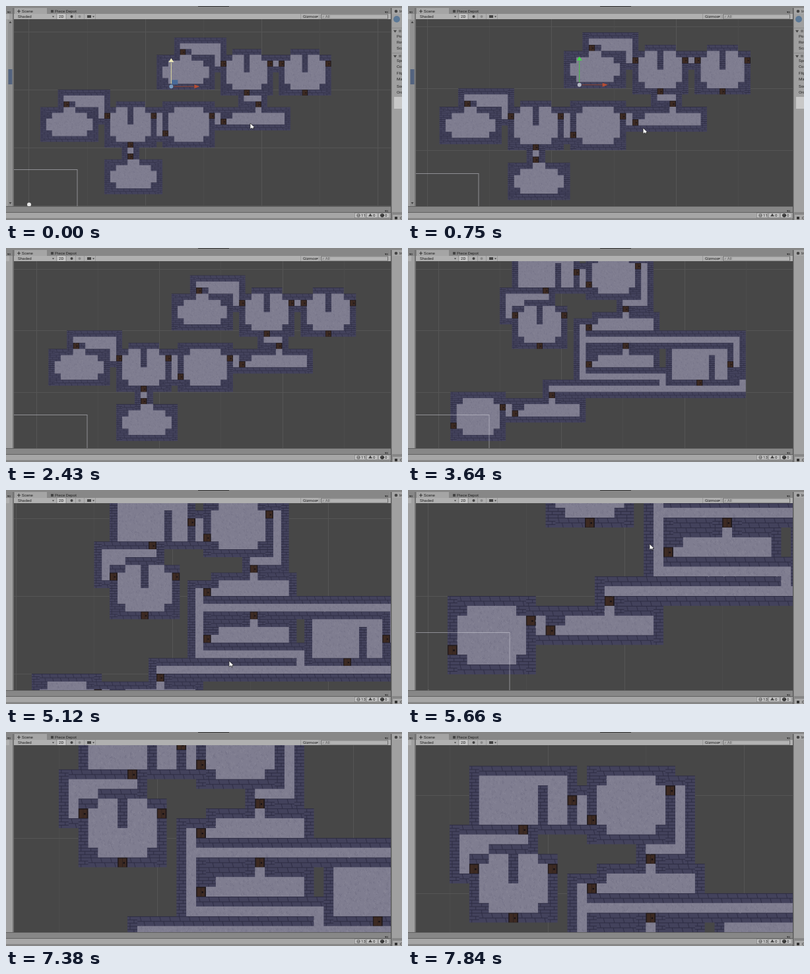
Recreate the animation shown at these times as an HTML page with a canvas. Size 600 by 325 pixels, loop 8 s.

```html
<!DOCTYPE html>
<html lang="en">
<head>
<meta charset="utf-8">
<title>Dungeon generator</title>
<style>
html, body { margin: 0; width: 100%; height: 100%; overflow: hidden; background: #8b8b8b; }
canvas { display: block; }
</style>
</head>
<body>
<canvas id="stage" width="600" height="325"></canvas>
<script>
const ctx = document.getElementById('stage').getContext('2d');
const LOOP = 8000, TILE = 30;
const LEFT = -10, TOP = -2, COLS = 54, ROWS = 36;   // tile area kept in a map image

let seed = 7;
const rnd = () => (seed = seed * 16807 % 2147483647) / 2147483647;

const UP = [0, -1], DOWN = [0, 1], WEST = [-1, 0], EAST = [1, 0];

// Room kinds: a body in local tiles, and doors given by place and direction.
const kinds = {
  forked: {
    doors: { left: [0, 2, WEST], right: [8, 2, EAST], bottom: [4, 7, DOWN] },
    body({ wall, floor, pillar }) {
      wall(0, 1, 9, 7); wall(2, 0, 5, 1);
      floor(2, 1, 5, 6); floor(1, 2, 7, 4);
      pillar(4, 1, 1, 3);
    }
  },
  oval: {
    doors: { top: [4, -1, UP] },
    body({ wall, floor }) {
      wall(0, 0, 10, 6);
      floor(4, 0, 2, 1); floor(2, 1, 6, 4); floor(1, 2, 8, 2);
    }
  },
  square: {
    doors: { left: [0, 5, WEST], right: [8, 2, EAST] },
    body({ wall, floor }) {
      wall(0, 0, 9, 8);
      floor(2, 1, 5, 6); floor(1, 2, 7, 4);
    }
  },
  hall: {
    doors: { left: [0, 2, WEST], top: [6, -1, UP] },
    body({ wall, floor }) {
      wall(1, 0, 11, 4); wall(0, 1, 12, 3);
      floor(2, 1, 9, 2); floor(1, 2, 1, 1); floor(6, 0, 1, 1);
    }
  },
  big: {
    doors: { bottom: [5, 6, DOWN], right: [10, 3, EAST] },
    body({ wall, floor, pillar }) {
      wall(0, 0, 11, 7); floor(1, 1, 9, 5); pillar(7, 2, 1, 4);
    }
  }
};

// Floors cut into walls; pillars and doors go on top.
function dungeon(build) {
  const cells = new Map();
  const fill = (type, x, y, w, h, keep) => {
    for (let j = y; j < y + h; j++) for (let i = x; i < x + w; i++) {
      const key = i + ',' + j;
      if (!keep || !cells.has(key)) cells.set(key, type);
    }
  };
  const pen = (x, y) => ({
    wall: (i, j, w, h) => fill('wall', x + i, y + j, w, h, true),
    pillar: (i, j, w, h) => fill('wall', x + i, y + j, w, h),
    floor: (i, j, w, h) => fill('floor', x + i, y + j, w, h)
  });
  const { wall, floor } = pen(0, 0);
  const path = (x1, y1, x2, y2) => {
    const x = Math.min(x1, x2), y = Math.min(y1, y2);
    const w = Math.abs(x2 - x1) + 1, h = Math.abs(y2 - y1) + 1;
    wall(x - 1, y - 1, w + 2, h + 2);
    floor(x, y, w, h);
  };
  const room = (kind, x, y) => {
    const { doors, body } = kinds[kind], outlets = {};
    body(pen(x, y));
    for (const name in doors) {
      const [i, j, [dx, dy]] = doors[name];
      fill('door', x + i, y + j, 1, 1);
      outlets[name] = { x: x + i + dx, y: y + j + dy, sideways: dx !== 0 };
    }
    return outlets;
  };
  // A corridor runs along the first door's wall, then turns once.
  const link = (a, b) => {
    const x = a.sideways ? a.x : b.x, y = a.sideways ? b.y : a.y;
    path(a.x, a.y, x, y);
    path(x, y, b.x, b.y);
  };
  build({ room, link, path, floor });
  return cells;
}

const firstDungeon = dungeon(({ room, link, floor }) => {
  const west = room('oval', -8, 16), fork = room('forked', 3, 15);
  const south = room('oval', 3, 25), square = room('square', 13, 15);
  const hall = room('hall', 23, 16), north = room('oval', 12, 7);
  const fork2 = room('forked', 23, 6), fork3 = room('forked', 33, 6);
  link(west.top, fork.left);
  link(fork.bottom, south.top);
  link(fork.right, square.left);
  link(square.right, hall.left);
  link(north.top, fork2.left);
  link(fork2.right, fork3.left);
  link(fork2.bottom, hall.top);
  for (const { x, y } of [west.top, north.top]) floor(x + 2, y + 1, 5, 1);
});

const secondDungeon = dungeon(({ room, link, path, floor }) => {
  const big = room('big', 2, 0), square = room('square', 14, 0), fork = room('forked', 2, 8);
  const hall = room('hall', 14, 10), hall2 = room('hall', 14, 16), big2 = room('big', 27, 15);
  const hall3 = room('hall', 2, 24), start = room('square', -8, 23);
  link(big.right, square.left);
  link(big.bottom, fork.left);
  floor(fork.left.x, 8, 3, 1);
  link(square.right, hall.top);
  link(hall2.top, hall.left);
  link(hall2.top, big2.right);
  link(hall.left, hall2.left);
  link(hall3.top, big2.bottom);
  link(start.right, hall3.left);
  path(13, 18, 13, 20);
  path(13, 20, 26, 20);
  path(26, 20, 26, 22);
  path(32, 22, 38, 22);
  path(38, 18, 38, 19);
  floor(38, 19, 1, 1);
  floor(39, 21, 1, 2);
});
// The lane beside the last big room ends at its door.
secondDungeon.set('38,19', 'wall');

const paintTile = {
  floor(g) {
    g.fillStyle = '#7f7d90';
    g.fillRect(0, 0, TILE, TILE);
    for (let i = 0; i < 14; i++) {
      g.strokeStyle = i % 2 ? '#706e83' : '#8d8b9c';
      g.beginPath();
      g.arc(rnd() * 26 + 2, rnd() * 26 + 2, 3, rnd() * 3, 4.5);
      g.stroke();
    }
  },
  wall(g, beside) {
    g.fillStyle = '#43425c';
    g.fillRect(0, 0, TILE, TILE);
    g.strokeStyle = '#2d2c42';
    g.lineWidth = 1.8;
    const bands = beside ? 3 : 2, height = TILE / bands, slant = beside ? 0 : 4;
    g.beginPath();
    for (let i = 0; i < bands; i++) {
      const y = i * height, x = i % 2 ? 20 : 8;
      g.moveTo(0, y + 1); g.lineTo(TILE, y + 1);
      g.moveTo(x, y); g.lineTo(x + slant, y + height);
    }
    g.stroke();
    g.lineWidth = 1;
  },
  door(g) {
    g.fillStyle = '#211a1d';
    g.fillRect(0, 0, TILE, TILE);
    g.fillStyle = '#3d2a22';
    for (const x of [3, 15]) g.fillRect(x, 3, 11, 26);
    g.fillStyle = '#151014';
    g.fillRect(17, 14, 5, 5);
  }
};

function mapImage(cells) {
  const image = document.createElement('canvas');
  image.width = COLS * TILE;
  image.height = ROWS * TILE;
  const g = image.getContext('2d');
  for (const [key, type] of cells) {
    const [x, y] = key.split(',').map(Number);
    if (x > 39 && cells === secondDungeon) continue;   // open east edge
    const solid = (i, j) => cells.get(i + ',' + j) === 'wall';
    const beside = (solid(x, y - 1) || solid(x, y + 1)) && !(solid(x - 1, y) && solid(x + 1, y));
    g.save();
    g.translate((x - LEFT) * TILE, (y - TOP) * TILE);
    paintTile[type](g, beside);
    g.restore();
  }
  return image;
}

const firstMap = mapImage(firstDungeon);
const secondMap = mapImage(secondDungeon);

// Camera: tile size s, screen place (x, y) of tile 0,0; pointer at (px, py).
const opening = { s: 8.81, x: 122.6, y: 12.6, px: 370, py: 178 };
const moves = [
  { from: 70, to: 1590, s: 10.19, x: 123.5, y: -10.3, px: 339, py: 194 },
  { from: 1590, to: 1970, s: 9.32, x: 138.9, y: 4.2 },
  { from: 4280, to: 5120, s: 11.8, x: 133.4, y: 7.8, px: 338, py: 260 },
  { from: 5120, to: 5660, s: 14.87, x: 178.8, y: -181, px: 366, py: 82 },
  { from: 5970, to: 6910, x: 97.3, y: -118.7, px: 183, py: 252 },
  { from: 6910, to: 7840, x: 63, y: 51.5, px: 150, py: 370 }
];

function viewAt(t) {
  const view = { ...opening };
  for (const { from, to, ...goal } of moves) {
    const p = Math.min(1, Math.max(0, (t - from) / (to - from)));
    for (const k in goal) view[k] += (goal[k] - view[k]) * p;
  }
  return view;
}

function rect(color, x, y, w, h) { ctx.fillStyle = color; ctx.fillRect(x, y, w, h); }
function text(s, x, y, size = 6.2, color = '#222') {
  ctx.font = size + 'px Roboto, Arial, sans-serif';
  ctx.fillStyle = color;
  ctx.fillText(s, x, y);
}
function shape(color, ...points) {
  ctx.fillStyle = color;
  ctx.beginPath();
  for (let i = 0; i < points.length; i += 2) ctx.lineTo(points[i], points[i + 1]);
  ctx.closePath();
  ctx.fill();
}
// Triangle with its tip r below (or above, for negative r) the middle.
const caret = (x, y, r = 1.5, color = '#444') => shape(color, x - r, y - r / 2, x + r, y - r / 2, x, y + r);
function disc(color, x, y, r) {
  ctx.fillStyle = color;
  ctx.beginPath();
  ctx.arc(x, y, r, 0, 7);
  ctx.fill();
}

function drawGrid({ s, x, y }) {
  for (let n = -30; n <= 60; n += 10) {
    rect(n / 10 % 2 ? '#555' : '#4c4c4c', Math.round(x + n * s), 20, 1, 284);
    rect('#555', 12, Math.round(y + (n + 3) * s), 571, 1);
  }
}

function drawMoveHandle(x, y, hovered) {
  rect(hovered ? '#ddd9a0' : '#48c048', x - .5, y - 36, 1, 32);
  caret(x, y - 39, -4, hovered ? '#eeeaba' : '#42dc48');
  rect('#8d4637', x + 4, y - .5, 32, 1);
  shape('#b84d32', x + 43, y, x + 35, y - 3, x + 35, y + 3);
  if (hovered) rect('#486a98', x + 1, y - 10, 9, 7);
  disc(hovered ? '#7799bd' : '#b5b9c5', x, y, 3);
}

function drawPointer(t, x, y) {
  if (t > 2280 && t < 4350) return;
  if (t > 5970) {
    disc('#eee', x, y + 1, 3.5);
    for (let i = -3; i < 4; i += 2) rect('#eee', x + i - .5, y - 4, 1.3, 4);
    return;
  }
  ctx.save();
  ctx.translate(x, y);
  ctx.strokeStyle = '#222';
  shape('#fff', 0, 0, 0, 9, 2.5, 7, 4.5, 10, 4.8, 6.5, 7, 6.5);
  ctx.lineWidth = .7;
  ctx.stroke();
  ctx.restore();
}

function drawScene(t) {
  const view = viewAt(t), { s, x, y } = view;
  ctx.save();
  ctx.beginPath();
  ctx.rect(12, 20, 571, 284);
  ctx.clip();
  rect('#474747', 12, 20, 571, 284);
  drawGrid(view);
  const map = t < 2820 ? firstMap : t < 3640 ? null : secondMap;
  ctx.imageSmoothingQuality = 'high';
  if (map) ctx.drawImage(map, x + LEFT * s, y + TOP * s, COLS * s, ROWS * s);
  ctx.strokeStyle = 'rgba(215,215,225,.5)';
  ctx.lineWidth = 1;
  ctx.strokeRect(-600, Math.round(y + 26.7 * s) + .5, Math.round(x - 1.66 * s) + 600, 600);
  disc('#e6e6e6', x - 9.94 * s, y + 32.8 * s, 3);
  if (t < 2280) drawMoveHandle(x + 14.5 * s, y + 12.45 * s, t < 500);
  drawPointer(t, view.px, view.py);
  ctx.restore();
}

function drawInspector(selected) {
  rect('#a0a0a0', 585, 12, 15, 301);
  rect('#a6a6a6', 585, 3, 15, 9);
  rect('#555', 583, 3, 1, 322);
  disc('#444', 591, 8, 2.3);
  text('In', 596, 10.4);
  rect('#a8a8a8', 586, 317, 14, 8);
  rect('#333', 589, 320, 4, 4);
  text('C', 597, 324);
  if (!selected) return;
  disc('#5b7896', 592, 20, 5);
  for (const y of [33, 71]) {
    rect('#8a8a8a', 585, y, 15, 1);
    caret(589.5, y + 5, 2.5);
    rect('#777', 595, y + 3, 4, 4);
  }
  'Pos Rot Sca'.split(' ').forEach((s, i) => text(s, 592, 48 + i * 9));
  'Spr Col Flip Mat'.split(' ').forEach((s, i) => text(s, 592, 85 + i * 9.3));
  'Sor Ord'.split(' ').forEach((s, i) => text(s, 592, 124 + i * 9));
  rect('#c8c8c8', 588, 138, 12, 18);
}

function drawTabs() {
  rect('#a5a5a5', 13, 3, 49, 9);
  rect('#333', 17, 7.5, 5, 1);
  rect('#333', 19, 5.5, 1, 5);
  text('Scene', 24, 10.3);
  rect('#444', 68, 6, 4, 4);
  text('Piece Depot', 74, 10.3);
  for (const [x, y] of [[2, 11], [574, 11], [574, 313]]) text('▾≡', x, y, 5);
}

function drawToolbar() {
  rect('#b0b0b0', 12, 12, 571, 8);
  rect('#c6c6c6', 78, 12, 12, 8);
  for (const x of [76, 91, 105, 118, 135, 446, 474]) rect('#999', x, 12, 1, 8);
  text('Shaded', 18, 18.2);
  text('2D', 80, 18.2);
  text('Gizmos', 450, 18.2);
  for (const x of [71.5, 132.5, 471.5]) caret(x, 16);
  disc('#444', 99.5, 16, 2);
  disc('#888', 111.5, 16, 2);
  rect('#444', 123, 14, 6, 4);
  rect('#6c6c6c', 477, 12.5, 102, 7);
  rect('#b4b4b4', 478, 13.3, 100, 5.6);
  text('⌕ All', 479, 18.2, 6, '#555');
}

function drawStatus(count) {
  rect('#a6a6a6', 0, 313.5, 583, 8.5);
  for (const y of [304, 313]) rect('#606060', 0, y, 583, 1);
  [count, '0', '0'].forEach((label, i) => {
    const x = 528 + i * 18;
    rect('#777', x, 314, 17, 8);
    rect('#c4c4c4', x + .6, 314.6, 16, 6.8);
    if (i === 1) caret(x + 6, 318, -3);
    else disc(i ? '#222' : '#777', x + 6, 318, 2.8);
    if (i !== 1) text('!', x + 5.2, 320.1, 5, '#fff');
    text(label, x + 10, 320.3);
  });
}

function drawWindow(t) {
  rect('#878787', 0, 0, 600, 325);
  rect('#333', 291, 0, 47, 1);
  rect('#a0a0a0', 0, 12, 10, 292);
  rect('#b0b0b0', 0, 12, 5, 8);
  rect('#606060', 10.5, 3, 1, 302);
  if (t < 2430) {
    rect('#919191', 3, 21, 7, 283);
    rect('#53637f', 3.5, 96, 6, 23);
    caret(6.5, 25, -2);
    caret(6.5, 299, 2);
  }
  drawTabs();
  drawToolbar();
  drawStatus(t < 2820 ? '11' : '13');
  drawInspector(t < 2280);
}

function frame(now) {
  const t = now % LOOP;
  drawWindow(t);
  drawScene(t);
  requestAnimationFrame(frame);
}
frame(0);
</script>
</body>
</html>
```
